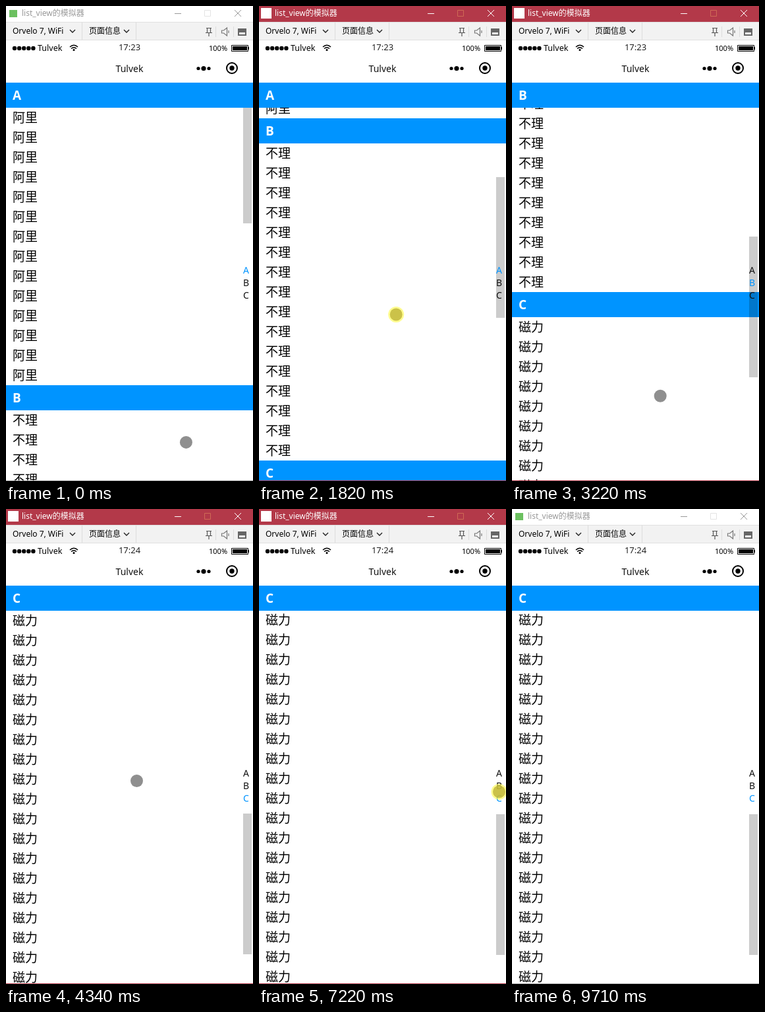
These frames come from a looping animation (375 px wide and 719 px high, 9.79 s). An HTML page with a canvas:

```html
<!DOCTYPE html>
<html lang="zh">
<head>
<meta charset="utf-8">
<style>
  html, body { margin: 0; width: 100%; height: 100%; overflow: hidden; background: #fff; }
  canvas { display: block; }
</style>
</head>
<body>
<canvas id="stage" width="375" height="719"></canvas>
<script>
const ctx = document.getElementById('stage').getContext('2d');
const LOOP = 9790, TOP = 116, HEADER = 38, ROW = 30, VIEW = 603;
const BLUE = '#0094ff', RED = '#b33949';
const FONT = '"Noto Sans", "Noto Sans CJK SC", "Noto Sans CJK", sans-serif';

const sections = [
  { letter: 'A', word: '阿里', count: 14 },
  { letter: 'B', word: '不理', count: 16 },
  { letter: 'C', word: '磁力', count: 23 },
];
let total = 0;
for (const s of sections) {
  s.start = total;
  total += HEADER + s.count * ROW;
}

// Each swipe drags the list with the finger, then lets it glide to rest.
const SWIPE = 500, GLIDE = 400;
const swipes = [
  { at: 700, drag: 190, glide: 89 },
  { at: 1500, drag: 194, glide: 60 },
  { at: 2400, drag: 107, glide: 20 },
  { at: 3225, drag: 180, glide: 136 },
];
// Then the finger holds the letter index.
const TOUCH = 5000, RELEASE = 8900, GONE = 9300;
const INDEX_TOP = 389, LETTER = 19;

const path = [
  { at: 0, x: 273, y: 660 },
  ...swipes.flatMap(s => [
    { at: s.at, x: 225, y: 591 },
    { at: s.at + SWIPE, x: 198, y: 591 - s.drag },
  ]),
  { at: 4400, x: 198, y: 411 },
  { at: TOUCH, x: 366, y: 437 },
  { at: 5600, x: 366, y: 410 },
  { at: 6400, x: 366, y: 410 },
  { at: 7000, x: 364, y: 427.5 },
  { at: RELEASE, x: 364, y: 427.5 },
  { at: GONE, x: 390, y: 437 },
];

const clamp = u => Math.min(1, Math.max(0, u));

function finger(t) {
  const i = path.findIndex(p => p.at > t);
  const a = path[i - 1], b = path[i];
  const u = (t - a.at) / (b.at - a.at);
  return { x: a.x + (b.x - a.x) * u, y: a.y + (b.y - a.y) * u };
}

function scrollAt(t) {
  if (t >= TOUCH) {
    const { y } = finger(Math.min(t, RELEASE));
    return sections[Math.floor((y - INDEX_TOP) / LETTER)].start + 1;
  }
  return swipes.reduce((sum, s) => {
    const rest = 1 - clamp((t - s.at - SWIPE) / GLIDE);
    return sum + s.drag * clamp((t - s.at) / SWIPE) + s.glide * (1 - rest * rest);
  }, 0);
}

function rect(x, y, w, h, color) {
  ctx.fillStyle = color;
  ctx.fillRect(x, y, w, h);
}

function disc(x, y, r, color) {
  ctx.fillStyle = color;
  ctx.beginPath();
  ctx.arc(x, y, r, 0, 7);
  ctx.fill();
}

function stroke(d, color, width = 1) {
  ctx.strokeStyle = color;
  ctx.lineWidth = width;
  ctx.stroke(new Path2D(d));
}

// y is the middle of the capitals
function text(s, x, y, size, color = '#000', align = 'left', weight = 400) {
  ctx.font = `${weight} ${size}px ${FONT}`;
  ctx.textAlign = align;
  ctx.fillStyle = color;
  ctx.fillText(s, x, y + size * 0.36);
}

function header(letter, y) {
  rect(0, y, 375, HEADER, BLUE);
  text(letter, 10, y + 19, 19, '#fff', 'left', 600);
}

function list(scroll) {
  for (const s of sections) {
    const y = TOP + s.start - scroll;
    header(s.letter, y);
    for (let i = 0; i < s.count; i++) {
      text(s.word, 10, y + HEADER + (i + 0.5) * ROW, 19, '#000', 'left', 300);
    }
  }
  const current = sections.filter(s => s.start <= scroll).pop();
  rect(360, Math.round(TOP + scroll * VIEW / total), 13, 213, 'rgba(0,0,0,.2)');
  sections.forEach((s, i) =>
    text(s.letter, 360, 400 + i * LETTER, 14, s === current ? BLUE : '#111'));
  header(current.letter, TOP);
}

function titleBar(active) {
  const ink = active ? '#fff' : '#999';
  rect(0, 0, 375, 24, active ? RED : '#fff');
  if (active) rect(3, 3, 16, 16, '#fff');
  else rect(5, 6, 12, 11, '#6cc060');
  text('list_view的模拟器', 24, 11, 12, ink);
  stroke('M256 11.5h10', ink);
  stroke('M301.5 6.5h9v9h-9z', active ? '#cf6a55' : '#e4e4e4');
  stroke('M347 6l10 10m0-10l-10 10', ink);
}

function toolBar() {
  rect(0, 24, 375, 28, '#f2f2f2');
  stroke('M0 24.5h375M0 51.5h375', '#e0e0e0');
  stroke('M115.5 25v26M197.5 25v26M318.5 31v16M345.5 31v16', '#dcdcdc');
  text('Orvelo 7, WiFi', 10, 38, 12);
  text('页面信息', 126, 38, 12);
  stroke('M97 36l4 4 4-4M179 36l4 4 4-4', '#222', 1.4);
  stroke('M304 33.5h8M305.5 34v6M310.5 34v6M303 40.5h10M308 41v5', '#555', 1.2);
  stroke('M327.5 37h3l5-4v12l-5-4h-3zM338 37v4', '#777', 1.2);
  rect(352, 34, 13, 11, '#666');
  rect(354, 40, 9, 3, '#f2f2f2');
}

function phoneBar(clock) {
  rect(0, 52, 375, 64, '#fff');
  for (let i = 0; i < 5; i++) disc(13 + i * 7.1, 64, 3.2, '#000');
  text('Tulvek', 48, 63, 12.5);
  stroke('M97 62q6-5.5 12 0M99 64.5q4-3.5 8 0', '#000', 1.6);
  disc(103, 66.5, 1.5, '#000');
  text(clock, 187.5, 62, 13, '#222', 'center');
  text('100%', 308, 64, 11);
  stroke('M342.5 59.5h25v9h-25z', '#000');
  rect(344, 61, 22, 6, '#000');
  rect(368, 62, 1, 4, '#000');
  text('Tulvek', 187.5, 94.5, 14, '#111', 'center');
  for (const side of [-8, 0, 8]) disc(300 + side, 94.5, side ? 2.6 : 3.6, '#000');
  disc(343, 94, 3.7, '#000');
  stroke('M335 94a8 8 0 1 0 16 0a8 8 0 1 0-16 0', '#000', 2);
}

function pointer(t) {
  if (t >= GONE) return;
  const { x, y } = finger(t);
  const pressed = t >= TOUCH && t < RELEASE ||
    swipes.some(s => t >= s.at && t < s.at + SWIPE);
  if (pressed) disc(x + 0.5, y + 0.5, 12, 'rgba(255,250,70,.6)');
  disc(x + 0.5, y + 0.5, 9.5, pressed ? 'rgba(185,175,50,.75)' : '#8f8f8f');
}

function draw(t) {
  const active = t >= swipes[0].at && t < GONE + 100;
  rect(0, 0, 375, 719, '#fff');
  list(Math.round(scrollAt(t)));
  titleBar(active);
  toolBar();
  phoneBar(t < 3700 ? '17:23' : '17:24');
  rect(0, 718, 375, 1, active ? RED : '#aaa');
  pointer(t);
}

const begin = performance.now();
function tick() {
  draw((performance.now() - begin) % LOOP);
  requestAnimationFrame(tick);
}
tick();
</script>
</body>
</html>
```
